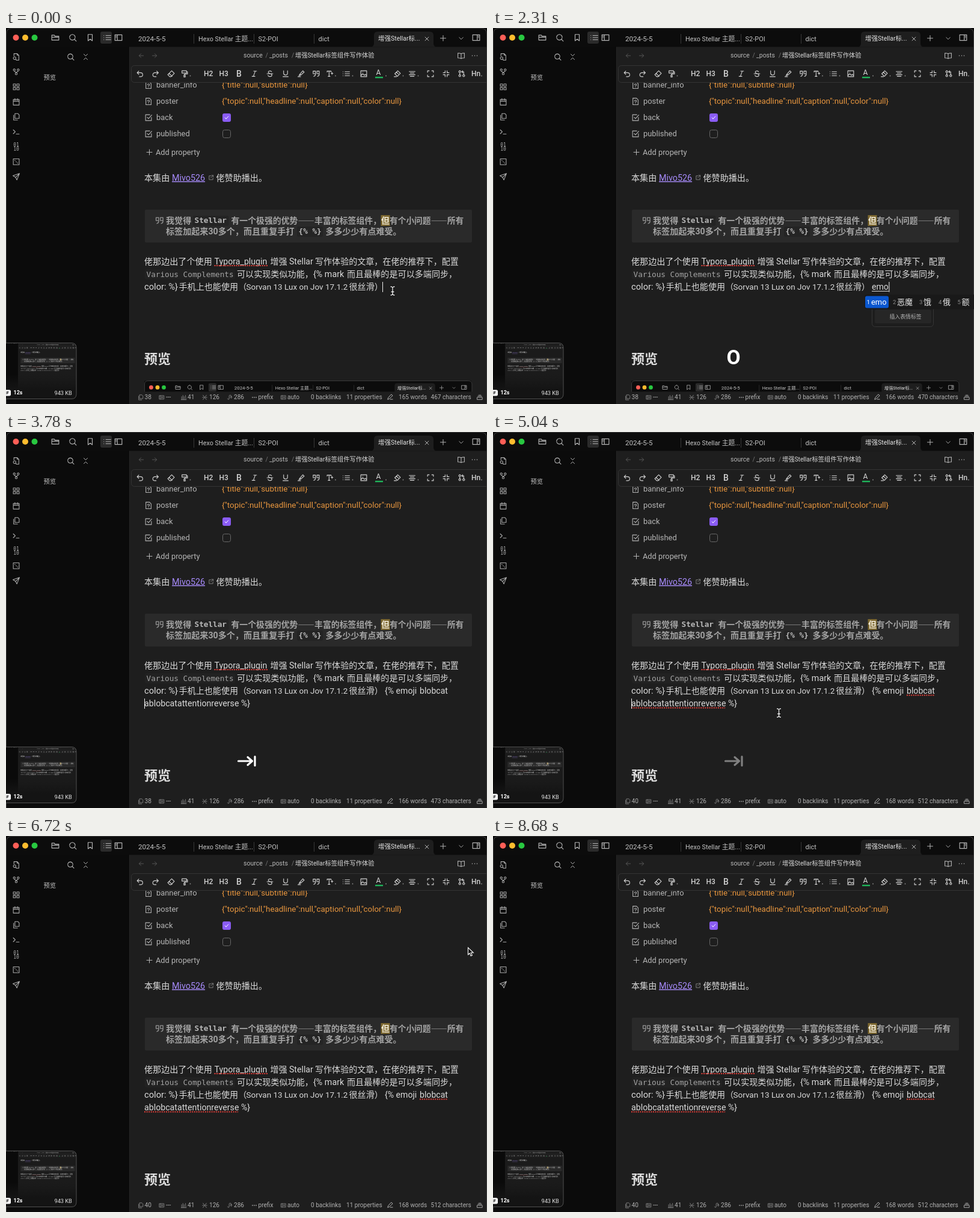
Animation of 800 by 625 pixels, one loop 8750 ms. Source, as an HTML page:

```html
<!DOCTYPE html>
<html lang="zh-CN">
<head>
<meta charset="utf-8">
<title>Editor typing demo</title>
<style>
html, body { margin: 0; width: 100%; height: 100%; overflow: hidden; background: #0b0b0b; }
svg { display: block; width: 800px; height: 625px; }
text { font-family: Roboto, "Noto Sans CJK SC", "Noto Sans CJK", sans-serif; white-space: pre; }
.m { font-family: "DejaVu Sans Mono", "Noto Sans CJK SC", monospace; }
.c { font-family: "Noto Sans CJK SC", "Noto Sans CJK", sans-serif; }
.b { font-weight: 700; }
.i { fill: none; stroke-linecap: round; stroke-linejoin: round; }
.sq { stroke: #e5403a; stroke-width: 1.8; stroke-dasharray: 2 1.6; }
</style>
</head>
<body>
<svg id="stage" viewBox="0 0 800 625" xmlns="http://www.w3.org/2000/svg"></svg>
<script>
const LOOP = 8750;
const stage = document.getElementById('stage');

// y is the visual middle of the line
const txt = (x, y, s, size, fill = '#dadada', more = '') =>
  `<text x="${x}" y="${y + size * 0.33}" font-size="${size}" fill="${fill}" ${more}>${s}</text>`;
const rect = (x, y, w, h, fill, rx = 0, more = '') =>
  `<rect x="${x}" y="${y}" width="${w}" height="${h}" rx="${rx}" fill="${fill}" ${more}/>`;
const line = (x1, y1, x2, y2, c, more = '') =>
  `<line x1="${x1}" y1="${y1}" x2="${x2}" y2="${y2}" stroke="${c}" ${more}/>`;
// icon on a 24 unit grid, centred on x, y
const icon = (x, y, size, d, c = '#b4b4b4', w = 2) => {
  const k = size / 24;
  return `<path class="i" transform="translate(${x - size / 2} ${y - size / 2}) scale(${k})" d="${d}" stroke="${c}" stroke-width="${w}"/>`;
};
const group = (id, s, more = '') => `<g id="${id}" ${more}>${s}</g>`;

const P = {
  folder: 'M2 19V5h7l2 3h11v11zM2 11h20',
  search: 'M11 3a8 8 0 1 0 .01 0M17 17l5 5',
  mark: 'M6 3h12v18l-6-5-6 5z',
  list: 'M8 6h14M8 12h14M8 18h14M2 6h.1M2 12h.1M2 18h.1',
  left: 'M2 4h20v16H2zM9 4v16M4.500 8h2M4.500 12h2',
  right: 'M2 4h20v16H2zM15 4v16M17.500 8h2M17.500 12h2',
  x: 'M5 5l14 14M19 5L5 19',
  plus: 'M12 3v18M3 12h18',
  down: 'M5 9l7 7 7-7',
  back: 'M20 12H4M11 5l-7 7 7 7',
  fwd: 'M4 12h16M13 5l7 7-7 7',
  book: 'M12 6c-3-2-6-2-10-2v15c4 0 7 0 10 2 3-2 6-2 10-2V4c-4 0-7 0-10 2zv15',
  dots: 'M4 12h.1M12 12h.1M20 12h.1',
  fileFind: 'M5 9V2h10l5 5v15h-8M15 2v5h5M7 12a4 4 0 1 0 .01 0M10 19l3 3',
  branch: 'M6 3a3 3 0 1 0 .01 0M18 3a3 3 0 1 0 .01 0M12 15a3 3 0 1 0 .01 0M6 9c0 4 6 2 6 6M18 9c0 4-6 2-6 6',
  grid: 'M3 3h7v7H3zM14 3h7v7h-7zM3 14h7v7H3zM14 14h7v7h-7z',
  cal: 'M3 5h18v17H3zM3 10h18M8 2v5M16 2v5',
  copy: 'M8 2h9l4 4v11H8zM4 7v15h12',
  term: 'M3 6l6 6-6 6M12 19h9',
  dice: 'M3 3h18v18H3zM7.500 7.500l1 1M11.500 11.500l1 1M15.500 15.500l1 1',
  send: 'M22 2L2 9l8 5 4 8zM22 2L10 14',
  fold: 'M6 3l6 6 6-6M6 21l6-6 6 6',
  undo: 'M8 4L3 9l5 5M3 9h11a6 6 0 0 1 0 12h-4',
  redo: 'M16 4l5 5-5 5M21 9H10a6 6 0 0 0 0 12h4',
  eraser: 'M8 21l-6-6L14 3l8 8-10 10zM6 11l9 9',
  brush: 'M4 3h14v7H4zM18 6h3v7h-9v3M10 16h4v6h-4z',
  strike: 'M17 6c-2-4-11-3-10 2 1 4 11 3 11 8 0 6-11 6-12 1M3 12h18',
  under: 'M6 3v7a6 6 0 0 0 12 0V3M4 21h16',
  pen: 'M9 13l9-10 4 4-10 9zM9 13l-3 5 6-2M3 21h8',
  quote: 'M9.500 12h-7V4h7v10q0 5-5 6M21 12h-7V4h7v10q0 5-5 6',
  type: 'M3 7V4h12v3M9 4v16M6 20h6M18 8v6M15 11h6',
  image: 'M3 3h18v18H3zM3 18l6-6 5 5 3-3 4 4M9 7h.1',
  bucket: 'M4 12l9-9 8 8-9 9zM2 21h7M9 7l6 6',
  align: 'M3 5h18M6 10h12M3 15h18M6 20h12',
  full: 'M3 8V3h5M16 3h5v5M21 16v5h-5M8 21H3v-5',
  shrink: 'M9 3v6H3M15 3v6h6M21 15h-6v6M3 15h6v6',
  pull: 'M6 3a3 3 0 1 0 .01 0M6 9v6M6 15a3 3 0 1 0 .01 0M18 15a3 3 0 1 0 .01 0M18 15V6h-6M15 3l-3 3 3 3',
  unknown: 'M4 2h11l5 5v15H4zM9 11c0-4 6-3 6 0 0 2-3 2-3 4M12 18h.1',
  check: 'M21 11v10H3V3h13M8 11l4 4L22 4',
  tick: 'M4 12l5 6L20 6',
  ext: 'M11 5H4v16h16v-7M14 3h7v7M21 3L11 13',
  tray: 'M3 13h18v8H3zM5 9h14M8 5h8',
  box: 'M3 5h18v14H3zM7 5v14M11 10h6M11 14h6',
  bars: 'M4 9v12M9 4v17M14 9v12M19 4l2 17M2 21h20',
  graph: 'M5 3l14 18M19 3L5 21M3 12h6M15 12h6',
  clip: 'M4 17a3 3 0 1 0 6 0V7a4 4 0 0 1 8 0v9M14 12l4-5 4 5'
};

// window chrome: title bar and tabs
const chrome = group('chrome',
  rect(0, 0, 800, 31.5, '#0c0c0c') +
  `<path d="M606 31.500q6 0 6-6V12q0-6 6-6h86q7 0 7 6v13.500q0 6 6 6z" fill="#1e1e1e"/>` +
  [[16.5, '#ff5f57'], [32, '#febc2e'], [47.5, '#28c840']].map(([x, c]) => `<circle cx="${x}" cy="16" r="5" fill="${c}"/>`).join('') +
  rect(157, 6, 19, 20, '#2b2b2b', 3) +
  [[82, 'folder'], [111, 'search'], [140, 'mark'], [168.5, 'list'], [187, 'left'], [782, 'right']].map(([x, n]) => icon(x, 16, 14, P[n])).join('') +
  icon(727, 17, 12, P.plus) + icon(757, 17, 11, P.down) + icon(700, 18, 10, P.x, '#d0d0d0') +
  txt(220, 18, '2024-5-5', 11.6, '#c4c4c4') +
  txt(320, 18, 'Hexo Stellar 主题...', 10.8, '#c4c4c4') +
  txt(419.5, 18, 'S2-POI', 11, '#c4c4c4') +
  txt(519.5, 18, 'dict', 11, '#c4c4c4') +
  txt(619, 18, '增强Stellar标...', 10.5, '#e4e4e4') +
  [312.5, 412.5, 512.5].map(x => line(x, 10, x, 26, '#383838')).join(''));

const side = rect(0, 31, 206, 594, '#0b0b0b') +
  ['fileFind', 'branch', 'grid', 'cal', 'copy', 'term', '', 'dice', 'send']
    .map((n, i) => n ? icon(17, 48 + i * 24.9, 13, P[n], '#aaa') : '').join('') +
  txt(12.2, 194.5, '01', 8, '#aaa', 'class="m"') + txt(12.2, 201.5, '10', 8, '#aaa', 'class="m"') +
  icon(107.5, 48, 13, P.search) + icon(132.5, 48, 12, P.fold) +
  txt(62.5, 83, '预览', 10.3, '#c4c4c4') +
  line(205.5, 31, 205.5, 625, '#262626');

const TB = '#d2d2d2';
const small = x => `<circle cx="${x}" cy="79.500" r=".9" fill="#888"/>`;
const toolbar = group('toolbar',
  rect(206, 31.5, 594, 59, '#1e1e1e') +
  icon(225, 46, 11, P.back, '#5a5a5a') + icon(247, 46, 11, P.fwd, '#5a5a5a') +
  txt(395, 46, 'source', 10.5, '#b8b8b8') + txt(431.5, 46, '/', 10.4, '#777') +
  txt(438, 46, '_posts', 10.5, '#b8b8b8') + txt(475, 46, '/', 10.4, '#777') +
  txt(481, 46, '增强Stellar标签组件写作体验', 10.25, '#dadada') +
  icon(757, 46, 13, P.book) + icon(779.5, 46, 12, P.dots, '#b4b4b4', 3) +
  rect(208.5, 62.5, 600, 28, '#1e1e1e', 5, 'stroke="#343434"') +
  [[223, 'undo'], [248.5, 'redo'], [274.5, 'eraser'], [297, 'brush'], [439, 'strike'], [465, 'under'], [490.5, 'pen'],
   [516, 'quote'], [539, 'type'], [566, 'list'], [595, 'image'], [651, 'bucket'], [675.5, 'align'], [706, 'full'],
   [732, 'shrink'], [758, 'pull']].map(([x, n]) => icon(x, 76, 13, P[n], TB, 2.1)).join('') +
  txt(329, 76, 'H2', 12, TB, 'font-weight="500"') + txt(354.5, 76, 'H3', 12, TB, 'font-weight="500"') +
  txt(383, 76, 'B', 14, TB, 'font-weight="500"') + icon(413, 76, 13, 'M10 4h9M5 20h9M15 4L9 20', TB) +
  txt(615.5, 74.5, 'A', 12, TB) + rect(614, 81, 13, 2.4, '#1fb45a') +
  txt(774, 76, 'Hn', 12, TB, 'font-weight="500"') +
  [306.5, 548, 576.5, 632, 660.5, 685.5, 791].map(small).join(''));

const LBL = '#b6b6b6', VAL = '#e9973f';
const props =
  [95, 122].map(y => icon(237, y, 13, P.unknown)).join('') +
  [149, 176].map(y => icon(237, y, 13, P.check)).join('') +
  ['banner_info', 'poster', 'back', 'published'].map((s, i) => txt(250, 95 + i * 27, s, 12.9, LBL)).join('') +
  txt(359, 95, '{"title":null,"subtitle":null}', 13.4, VAL) +
  txt(359, 122, '{"topic":null,"headline":null,"caption":null,"color":null}', 13.4, VAL) +
  rect(360, 142, 14, 14, '#8a5cf5', 3) + icon(367, 149, 8.5, P.tick, '#fff', 2.8) +
  rect(360.5, 169.5, 13, 13, 'none', 3, 'stroke="#686868"') +
  icon(238.5, 206.5, 12, P.plus) + txt(249, 206.5, 'Add property', 12.8, LBL);

const Q = '#a4a4a4';
const qt = (x, y, s, size = 13.87, cls = 'c b') => txt(x, y, s, size, Q, `class="${cls}"`);
const mono = (x, y, s, c, more = '') => txt(x, y, s, 12.7, c, `class="m ${more}"`);
const article = group('article',
  txt(230, 249, '本集由', 14.1) +
  txt(276, 249, 'Mivo526', 14.3, '#a68af9', 'text-decoration="underline"') + icon(341, 248.5, 9.5, P.ext, '#999') +
  txt(349.5, 249, '佬赞助播出。', 14.1) +
  rect(231, 302, 544, 54.5, '#2a2a2a', 2) +
  icon(255.5, 320, 15, P.quote, '#969696') +
  qt(266, 320, '我觉得', 14.1) +
  rect(310.5, 312, 60, 17, '#242424', 3) + mono(313.5, 320, 'Stellar', '#b8b8b8', 'b') +
  qt(374.5, 320, '有一个极强的优势——丰富的标签组件，') +
  rect(623.5, 311, 15, 18, '#7d6830') + txt(624, 320, '但', 13.9, '#f0ead8', 'class="b"') +
  qt(638, 320, '有个小问题——所有', 13.7) +
  qt(266, 338, '标签加起来30多个，而且重复手打', 14.1, 'b') +
  rect(484, 330, 43, 17, '#242424', 3) + mono(486.5, 338, '{% %}', '#b8b8b8', 'b') +
  qt(531.5, 338, '多多少少有点难受。', 14) +
  txt(230, 388, '佬那边出了个使用', 14.1) + txt(346.5, 388, 'Typora_plugin', 14.2) +
  line(346.5, 395, 435, 395, '', 'class="sq"') +
  txt(439.5, 388, '增强', 14.1) + txt(471, 388, 'Stellar', 14.1) +
  txt(514, 388, '写作体验的文章，在佬的推荐下，配置', 14.05) +
  rect(231, 401, 150, 17, '#222', 3) + mono(233.5, 409.5, 'Various Complements', '#a4a4a4') +
  txt(384, 409.5, '可以实现类似功能，', 14.1) + txt(511, 409.5, '{% mark', 14.3) +
  txt(567, 409.5, '而且最棒的是可以多端同步，', 14.1) +
  txt(230, 430.5, 'color: %}', 14.7) + txt(287.5, 430.5, '手机上也能使用（', 14.1) +
  txt(399.5, 430.5, 'Sorvan 13 Lux on Jov 17.1.2', 13.5) +
  txt(570.5, 430.5, '很丝滑）', 14.1));

const inserted = group('inserted',
  txt(630, 430.5, '{% emoji', 14.1) + txt(688, 430.5, 'blobcat', 14.1) +
  txt(230, 451.5, 'ablobcatattentionreverse %}', 14.2));
const squiggles = group('squiggles',
  line(688, 437.5, 735, 437.5, '', 'class="sq"') + line(230, 458.5, 386, 458.5, '', 'class="sq"'));

const below = group('below',
  txt(230, 551, '预览', 22, '#dcdcdc', 'class="b"') +
  rect(230.5, 586.5, 544.5, 60, '#0c0c0c', 5) +
  `<use href="#chrome" transform="translate(230.200 586.500) scale(.68)"/>` +
  `<path d="M230.500 646V592q0-5.500 6-5.500h532q6.500 0 6.500 5.500v54" fill="none" stroke="#3a3a3a"/>`);

const ST = '#b0b0b0';
const st = (x, s, id = '') => txt(x, 613.5, s, 10.1, ST, id && `id="${id}"`);
const status = rect(206, 604.5, 594, 21, '#1e1e1e') +
  [[224, 'copy'], [259, 'box'], [295.5, 'bars'], [330.5, 'graph'], [372, 'clip'], [461.5, 'box']]
    .map(([x, n]) => icon(x, 614, 10, P[n], '#8c8c8c')).join('') +
  line(409, 614, 417, 614, '#8c8c8c', 'stroke-width="1.500" stroke-dasharray="2 1"') +
  st(230.5, '38', 'links') + st(266, '---') + st(302, '41') + st(338, '126') + st(379, '286') + st(419.5, 'prefix') +
  st(468, 'auto') + st(507, '0 backlinks') + st(566, '11 properties') +
  icon(639, 613, 11, 'M3 21l2-6L16 3l5 5L9 19zM12 21h9', '#c0c0c0') +
  st(653, '', 'words') + st(706.5, '', 'chars') + icon(788, 613.5, 11, P.tray, '#b0b0b0');

const thumb = `<g clip-path="url(#thumbClip)">` +
  rect(0, 524, 117, 93, '#1b1b1b') + rect(0, 524, 20, 93, '#0a0a0a') +
  `<use href="#chrome" transform="translate(-14 520.500) scale(.166)"/>` +
  `<use href="#toolbar" transform="translate(-14 519) scale(.166)"/>` +
  `<use href="#article" transform="translate(-14 498) scale(.166)"/>` +
  rect(0, 576, 117, 41, 'url(#shade)') +
  rect(-9, 601.5, 17, 10, '#fff', 2.5) + txt(-7.4, 606.5, 'GIF', 8, '#1a1a1a', 'class="b"') +
  txt(12.5, 606.5, '12s', 9, '#fff', 'class="b"') + txt(80.5, 606.5, '943 KB', 9.2, '#e6e6e6') +
  `</g><path d="M0 523.500h109q8 0 8 8v77q0 8-8 8H0" fill="none" stroke="#515151"/>`;

const popup = group('popup',
  rect(630.5, 444.5, 102, 52, '#1d1d1d', 5, 'stroke="#363636"') + txt(640, 455, 'emoji', 11.5, '#cfcfcf') +
  rect(635, 468, 94, 23, '#262626', 3) + txt(659.5, 480, '插入表情标签', 8.9, '#b4b4b4'));

const cand = (x, n, s) => txt(x, 455.5, n, 9.5, '#8c8c8c') + txt(x + 7, 455.5, s, 13, '#ececec');
const bar = group('bar',
  rect(618, 443, 190, 24.5, '#191919', 4) + rect(619, 445.5, 45, 20, '#0a57cf', 3, 'id="pickBox"') +
  txt(621.5, 455.5, '1', 9.5, '#fff') + txt(629, 455.5, '', 12.9, '#fff', 'id="pick"') +
  group('rest', cand(671, 2, '恶魔') + cand(715, 3, '饿') + cand(747, 4, '俄') + cand(778.5, 5, '额')));

const key = group('key',
  txt(400, 548, '', 33.5, '#fff', 'id="letter" text-anchor="middle" font-weight="600"') +
  `<path id="tab" class="i" d="M386.500 547H409M402 540.500l7.500 6.500-7.500 6.500M414 539.500v15" stroke="#fff" stroke-width="3.200"/>`);

const beam = 'M-3 -7q3 0 3 2.500V4.500Q0 7 -3 7M3 -7q-3 0 -3 2.500M0 4.500Q0 7 3 7M-2 1.500h4';
const pointer = group('beam',
    `<path class="i" d="${beam}" stroke="#111" stroke-width="3"/><path class="i" d="${beam}" stroke="#f2f2f2" stroke-width="1.300"/>`) +
  group('arrow', `<path d="M0 0v11.800l2.700-2.500 1.900 4.500 2.200-.900-1.900-4.400h3.900z" fill="#111" stroke="#fff" stroke-width="1.100"/>`);

stage.innerHTML =
  `<defs><clipPath id="pageClip"><rect x="206" y="90" width="594" height="515"/></clipPath>
  <clipPath id="thumbClip"><path d="M0 523.500h109q8 0 8 8v77q0 8-8 8H0z"/></clipPath>
  <linearGradient id="shade" x2="0" y2="1"><stop offset="0" stop-color="#161616" stop-opacity="0"/><stop offset=".6" stop-color="#141414"/></linearGradient></defs>` +
  rect(0, 0, 800, 625, '#1e1e1e') + side +
  `<g clip-path="url(#pageClip)">` + props + article + inserted + squiggles + below +
  group('typing', txt(630, 430.5, '', 14.1, '#dadada', 'id="typed"') + line(630, 437.5, 630, 437.5, '#dadada', 'id="rule"')) +
  rect(0, 0, 1, 17, '#f0f0f0', 0, 'id="caret"') + `</g>` +
  status + toolbar + chrome +
  `<path d="M.500 625V10q0-9.500 9.500-9.500h780q9.500 0 9.500 9.500v615" fill="none" stroke="#3c3c3c"/>` +
  popup + bar + thumb + key + pointer;

const el = id => document.getElementById(id);
const show = (id, on) => el(id).setAttribute('display', on ? 'inline' : 'none');
const set = (id, o) => { for (const k in o) el(id).setAttribute(k, o[k]); };
const put = (id, s) => { if (el(id).textContent !== s) el(id).textContent = s; };

const WORD = 'emoji', PRESS = [1680, 1960, 2240, 2450, 2660];
const SPACE = 1540, COMMIT = 3430, TAB = 3710, CHECK = 4200, LAG = 140, BLUR = 7420;
// pointer stops: time, x, y
const PATH = [[0, 643, 437], [4690, 620, 441], [4970, 475.5, 467], [5530, 475.5, 467],
  [6400, 768.5, 185.5], [7140, 768.5, 185.5], [7420, 806, -16]];

function pointerAt(t) {
  let i = PATH.length - 1;
  while (i && PATH[i][0] > t) i--;
  // at rest until the first key hides it
  const a = PATH[i], b = i && PATH[i + 1] || a;
  const u = b === a ? 0 : (t - a[0]) / (b[0] - a[0]), e = u * u * (3 - 2 * u);
  return [a[1] + (b[1] - a[1]) * e, a[2] + (b[2] - a[2]) * e];
}

function draw(t) {
  const count = at => PRESS.filter(p => p <= at).length;
  const n = count(t), done = t >= TAB;
  const composing = n > 0 && t < COMMIT;

  put('typed', WORD.slice(0, n));
  show('typing', n && !done);
  const w = n && !done ? el('typed').getComputedTextLength() : 0;
  set('rule', { x2: 630 + w });
  show('rule', composing);
  show('inserted', done);
  show('squiggles', t >= CHECK);
  set('below', { transform: `translate(0 ${done ? 21 : 0})` });

  // candidates come up shortly after the first letter
  const barOn = composing && t >= PRESS[0] + 140;
  show('bar', barOn);
  if (barOn) {
    put('pick', WORD.slice(0, n));
    const pw = el('pick').getComputedTextLength() + 13.5;
    set('pickBox', { width: pw });
    set('rest', { transform: `translate(${n === 5 ? 0 : pw - 45} 0)` });
  }
  show('popup', n >= 3 && !done);

  const last = done ? TAB : n ? PRESS[n - 1] : t >= SPACE ? SPACE : 0;
  const cx = done ? 230 : n ? 630.5 + w : t >= SPACE ? 630 : 626;
  set('caret', { x: cx, y: done ? 443 : 422 });
  show('caret', t < BLUR && (t - last) % 1200 < 600);

  const seen = t - LAG;
  const checked = t >= CHECK;
  put('links', checked ? '40' : '38');
  put('words', (checked ? 168 : count(seen) ? 166 : 165) + ' words');
  put('chars', (checked ? 512 : 467 + (seen >= SPACE ? 1 : 0) + count(seen)) + ' characters');

  show('key', n);
  show('tab', done);
  put('letter', done || !n ? '' : WORD[n - 1].toUpperCase());
  set('key', { opacity: Math.max(0, Math.min(1, 1 - (t - last - 1050) / 500)) });

  const [x, y] = pointerAt(t);
  const visible = t < SPACE || (t >= PATH[1][0] && t < BLUR);
  const isArrow = x > 762 || y < 90;
  show('beam', visible && !isArrow);
  show('arrow', visible && isArrow);
  set(isArrow ? 'arrow' : 'beam', { transform: `translate(${x} ${y})` });
}

const start = performance.now();
function tick() {
  draw((performance.now() - start) % LOOP);
  requestAnimationFrame(tick);
}
tick();
</script>
</body>
</html>
```
